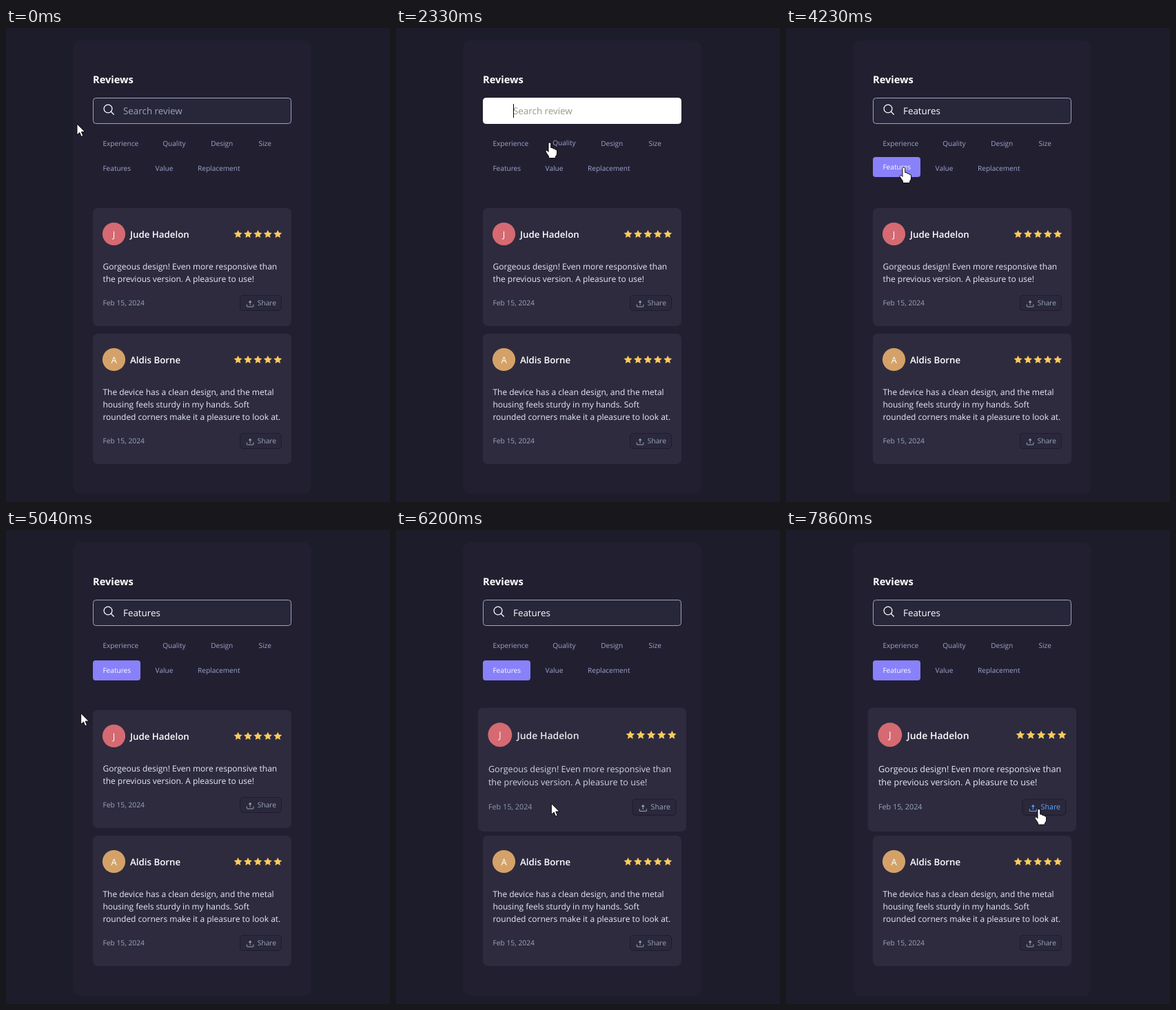
These frames come from a looping animation (557x687 px, 8 s). An HTML page:

```html
<!DOCTYPE html>
<html lang="en">
<head>
<meta charset="utf-8">
<title>Reviews</title>
<style>
  html, body { margin: 0; width: 100%; height: 100%; overflow: hidden; background: #1d1c2a; }
  svg { display: block; font: 12px "Open Sans", "Noto Sans", sans-serif; text-rendering: geometricPrecision; }
  .name { font-size: 13.3px; font-weight: 600; fill: #fff; }
  .body { fill: #e6eaf4; }
  .small { font-size: 10.3px; fill: #9ba8bd; }
  .chip { font-size: 10.1px; }
  .field { font-size: 13.4px; }
  .line { fill: none; stroke-linecap: round; stroke-linejoin: round; }
  .pointer { fill: #fff; stroke: #000; stroke-width: .9; stroke-linejoin: round; }
</style>
</head>
<body>
<svg width="557" height="687" viewBox="0 0 557 687">
  <rect x="97" y="18" width="346" height="657" rx="11" fill="#221f30"/>
  <text x="126" y="80" fill="#fff" font-size="14.6" font-weight="700">Reviews</text>

  <rect id="box" x="126.5" y="101.5" width="287" height="37" rx="4"/>
  <g id="lens" class="line" stroke="#fff" stroke-width="1.25">
    <circle cx="148" cy="117" r="5.9"/><path d="M152.3 121.3l4 4"/>
  </g>
  <text id="query" class="field" x="170" y="125"></text>
  <rect id="caret" x="170" y="110" width="1" height="20"/>

  <g id="chips"></g>
  <g id="cards"></g>

  <g id="cursor">
    <path id="arrow" class="pointer" d="M0 0V16L3.8 12.6 6.2 18.4 8.8 17.3 6.4 11.6H11.6Z"/>
    <path id="hand" class="pointer" d="M-2 1.6Q-2 0-.2 0 1.7 0 1.7 1.6V7.5Q5 7 5 9 8 8.4 8 10.2 10.5 9.8 10.5 12V16Q10.5 18.5 8.5 20V22.6H-1.5V20L-5.5 14Q-6.5 12-5 11.3-3.5 11-2 13.5Z"/>
    <path id="beam" class="line" stroke="#000" d="M-3-8.5H-1L0-7.5 1-8.5H3M0-7.5V7.5M-3 8.5H-1L0 7.5 1 8.5H3"/>
  </g>
</svg>
<script>
const LOOP = 8000;
const MUTED = '#9aa7bc', CHIP = '#9ca6cd', ACCENT = '#8981fa';
const $ = id => document.getElementById(id);
const set = (el, attrs) => { for (const k in attrs) el.setAttribute(k, attrs[k]); };

const ramp = (t, a, b) => Math.min(1, Math.max(0, (t - a) / (b - a)));
const ease = k => k * k * (3 - 2 * k);
const pulse = (t, a, b, c, d) => ramp(t, a, b) - ramp(t, c, d);
const mix = (from, to, k) => 'rgb(' + [1, 3, 5].map(i => {
  const a = parseInt(from.substr(i, 2), 16), b = parseInt(to.substr(i, 2), 16);
  return Math.round(a + (b - a) * k);
}) + ')';

// Filter chips: label, text x, box top, box width
const chips = [
  ['Experience', 140.4, 153, 81], ['Quality', 227.2, 153, 63], ['Design', 297.2, 153, 62], ['Size', 366.4, 153, 48],
  ['Features', 140.4, 189, 69], ['Value', 216.6, 189, 55], ['Replacement', 278, 189, 91]
].map(([label, x, y, w]) => {
  $('chips').insertAdjacentHTML('beforeend', `<g>
    <rect x="${x - 14.4}" y="${y}" width="${w}" height="29" rx="4" fill="${ACCENT}" opacity="0"/>
    <text class="chip" x="${x}" y="${y + 17.7}" fill="${CHIP}">${label}</text></g>`);
  return { el: $('chips').lastElementChild, x: x - 14.4, y, w, h: 29 };
});

const starPath = 'M' + Array.from({ length: 10 }, (_, i) => {
  const r = i % 2 ? 3 : 6.3, a = (i / 5 - .5) * Math.PI;
  return (r * Math.cos(a)).toFixed(2) + ' ' + (r * Math.sin(a)).toFixed(2);
}).join('L') + 'Z';

function addCard(y, h, color, name, lines) {
  const foot = y + h - 30;
  const stars = [0, 1, 2, 3, 4].map(i =>
    `<path d="${starPath}" fill="#fdcb5c" transform="translate(${336.6 + i * 14.4} ${y + 38})"/>`).join('');
  const body = lines.map((s, i) => `<text class="body" x="140.4" y="${y + 89 + i * 18}">${s}</text>`).join('');
  $('cards').insertAdjacentHTML('beforeend', `<g>
    <rect x="126" y="${y}" width="288" height="${h}" rx="7" fill="#2e2b3f"/>
    <circle cx="156.5" cy="${y + 37.5}" r="16.6" fill="${color}"/>
    <g class="content">
      <text x="156.5" y="${y + 42.5}" font-size="13" fill="#fff" text-anchor="middle">${name[0]}</text>
      <text class="name" x="180" y="${y + 43}">${name}</text>
      ${body}<text class="small" x="140.4" y="${foot}">Feb 15, 2024</text>
    </g>${stars}
    <rect x="339.5" y="${foot - 14.5}" width="60" height="22" rx="4.5" fill="#2b283b" stroke="#1e1c2b"/>
    <g class="share" fill="${MUTED}" stroke="${MUTED}">
      <path class="line" d="M349.3 ${foot - 1}v2.2q0 .8.8.8h8q.8 0 .8-.8v-2.2M354.1 ${foot - .8}v-5.2"/>
      <path d="M352.2 ${foot - 4.6}l1.9-2.2 1.9 2.2z" stroke-width=".6"/>
      <text x="364.8" y="${foot}" font-size="10.2" stroke="none">Share</text>
    </g></g>`);
  return $('cards').lastElementChild;
}
const card = addCard(261, 171, '#d56a72', 'Jude Hadelon',
  ['Gorgeous design! Even more responsive than', 'the previous version. A pleasure to use!']);
addCard(443, 189, '#d4a268', 'Aldis Borne',
  ['The device has a clean design, and the metal', 'housing feels sturdy in my hands. Soft', 'rounded corners make it a pleasure to look at.']);
const content = card.querySelector('.content'), share = card.querySelector('.share');

// Pointer route: time, x, y
const route = [
  [0, 103, 139], [430, 103, 139], [900, 148, 141], [1230, 178, 124], [1860, 178, 124], [2330, 223, 166],
  [2580, 227, 168], [3300, 227, 168], [3630, 213, 188.6], [4000, 171, 202], [4560, 171, 202],
  [5370, 66, 309], [5780, 78, 348], [6200, 225, 396.5], [6460, 321, 391], [6800, 321, 391],
  [7460, 364, 404], [7600, 364, 404], [7860, 367, 404.5], [LOOP, 367, 404.5]
];
function pointerAt(t) {
  const i = route.findIndex(p => p[0] > t), [t0, x0, y0] = route[i - 1], [t1, x1, y1] = route[i];
  const k = (t - t0) / (t1 - t0);
  return [x0 + (x1 - x0) * k, y0 + (y1 - y0) * k];
}

const field = { x: 126, y: 101, w: 288, h: 38 };
const shareBox = { x: 342, y: 390, w: 64, h: 24 };

function drawChip({ el }, lift, selected) {
  set(el, { transform: `translate(0 ${-2 * lift})` });
  set(el.firstElementChild, { opacity: selected });
  set(el.lastElementChild, { fill: mix(CHIP, '#ffffff', selected) });
}

function draw(t) {
  const focus = pulse(t, 1120, 1250, 2540, 2610);
  set($('box'), { fill: mix('#282639', '#ffffff', focus), stroke: mix(MUTED, '#ffffff', focus) });
  set($('lens'), { opacity: 1 - focus });
  const empty = t < 2750;
  $('query').textContent = empty ? 'Search review' : t < 4090 ? 'Quality' : 'Features';
  set($('query'), { fill: empty ? mix(MUTED, '#9c9883', focus) : '#fff' });
  set($('caret'), { opacity: +(t >= 1190 && t < 1720 || t >= 2250 && t < 2560) });

  drawChip(chips[1], pulse(t, 2250, 2420, 3400, 3560), pulse(t, 2750, 2890, 4090, 4230));
  drawChip(chips[4], pulse(t, 3820, 4000, 4640, 4800), ramp(t, 4090, 4230));

  const grow = ease(ramp(t, 5920, 6180));
  set(card, { transform: `translate(270 ${346.5 + .7 * grow}) scale(${1 + .05 * grow}) translate(-270 -346.5)` });
  set(content, { opacity: 1 - .12 * pulse(t, 5920, 6060, 6200, 6440) });
  const tint = mix(MUTED, '#60a5fa', ramp(t, 7120, 7280));
  set(share, { fill: tint, stroke: tint });

  const [x, y] = pointerAt(t);
  const over = b => x >= b.x && x <= b.x + b.w && y >= b.y && y <= b.y + b.h;
  const kind = over(field) ? 'beam' : chips.some(over) || over(shareBox) ? 'hand' : 'arrow';
  for (const id of ['arrow', 'hand', 'beam']) set($(id), { display: id === kind ? 'inline' : 'none' });
  set($('cursor'), { transform: `translate(${x} ${y})` });
}

const start = performance.now();
(function frame() {
  draw((performance.now() - start) % LOOP);
  requestAnimationFrame(frame);
})();
</script>
</body>
</html>
```
